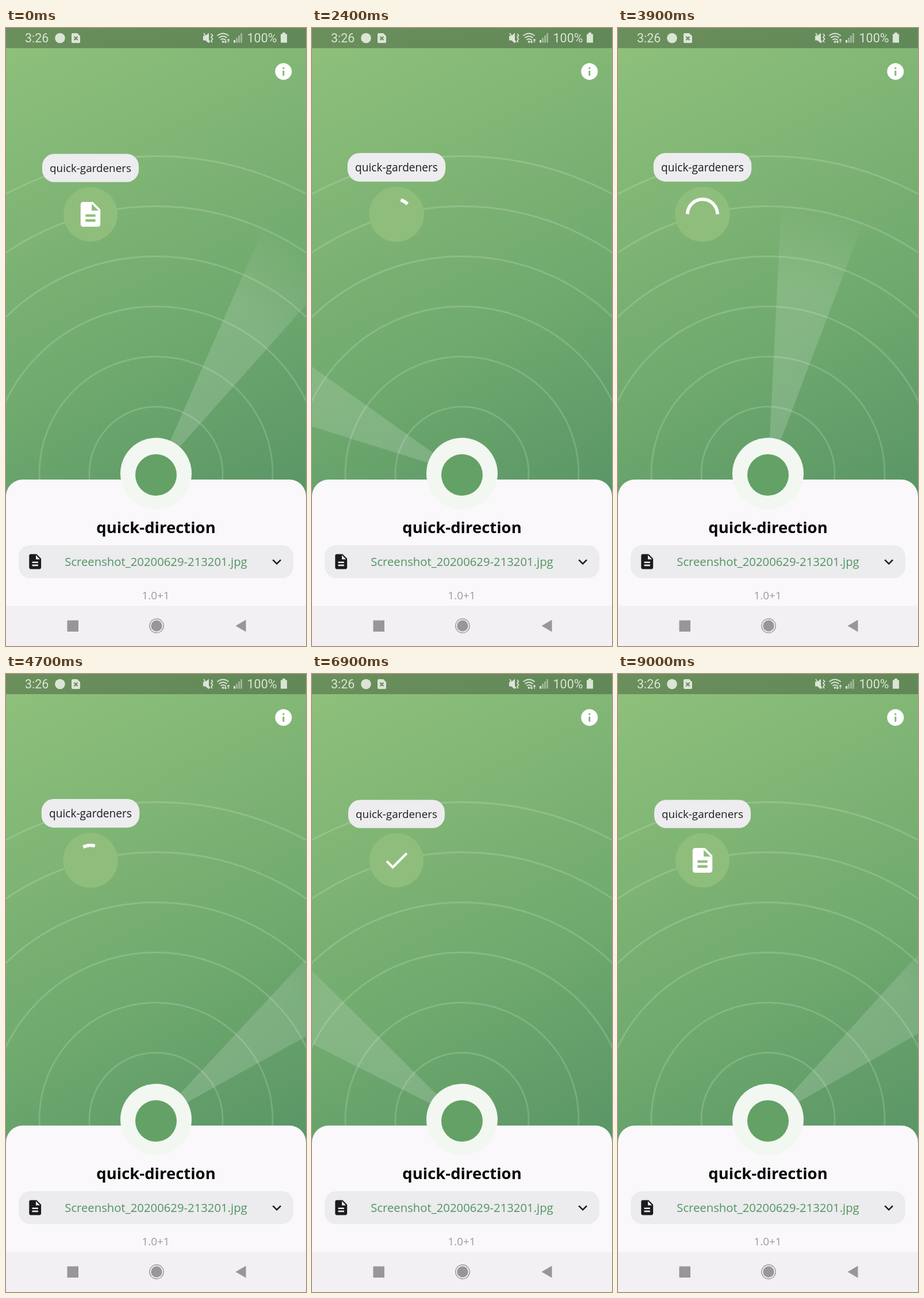
Write an HTML page that moves like this. It is 522 px wide and 1073 px high and loops after 9100 ms.

```html
<!DOCTYPE html>
<html lang="en">
<head>
<meta charset="utf-8">
<title>File drop radar</title>
<style>
  html, body { margin: 0; width: 100%; height: 100%; overflow: hidden; background: #faf8fb; }
  svg { display: block; width: 100vw; height: 100vh; }
  text { font-family: "Open Sans", sans-serif; }
  .status text { font-family: Roboto, sans-serif; font-size: 21.5px; }
</style>
</head>
<body>
<svg viewBox="0 0 522 1073" xmlns="http://www.w3.org/2000/svg">
  <defs>
    <linearGradient id="field" gradientUnits="userSpaceOnUse" x1="0" y1="0" x2="522" y2="1073">
      <stop offset="0" stop-color="#90c17c"/>
      <stop offset=".5" stop-color="#70aa6e"/>
      <stop offset=".78" stop-color="#5b9767"/>
    </linearGradient>
    <radialGradient id="beam" gradientUnits="userSpaceOnUse" cx="0" cy="0" r="464">
      <stop offset="0" stop-color="#fff" stop-opacity=".17"/>
      <stop offset=".7" stop-color="#fff" stop-opacity=".14"/>
      <stop offset="1" stop-color="#fff" stop-opacity=".01"/>
    </radialGradient>
    <path id="doc" d="M14 2H6c-1.1 0-1.99.9-1.99 2L4 20c0 1.1.89 2 1.99 2H18c1.1 0 2-.9 2-2V8l-6-6zm2 16H8v-2h8v2zm0-4H8v-2h8v2zm-3-5V3.5L18.5 9H13z"/>
  </defs>

  <rect width="522" height="1073" fill="url(#field)"/>
  <g id="rings" fill="none" stroke="#fff" stroke-opacity=".16" stroke-width="2.9"></g>
  <path id="sweep" fill="url(#beam)" d="M0 0L-72.6 -458.3A464 464 0 0 1 72.6 -458.3Z"/>

  <g id="peer">
    <rect x="63" y="218.5" width="168" height="49" rx="21" fill="#edecef"/>
    <text x="147" y="250" font-size="18.85" text-anchor="middle" fill="#1c1c1e">quick-gardeners</text>
    <circle cx="147" cy="323.5" r="47" fill="#8fbe7c"/>
    <use id="file" href="#doc" transform="translate(121.2 297.7) scale(2.15)" fill="#fff"/>
    <path id="check" transform="translate(121.2 297.7) scale(2.15)" fill="#fff" d="M9 16.17L4.83 12l-1.42 1.41L9 19 21 7l-1.41-1.41z"/>
  </g>
  <path id="spinner" fill="none" stroke="#fff" stroke-width="5.8" stroke-linecap="square"/>

  <path transform="translate(465.4 58.1) scale(1.45)" fill="#fff" d="M12 2C6.48 2 2 6.48 2 12s4.48 10 10 10 10-4.48 10-10S17.52 2 12 2zm1 15h-2v-6h2v6zm0-8h-2V7h2v2z"/>

  <g class="status" fill="#dbe5d6">
    <rect width="522" height="35" fill="#000" fill-opacity=".26"/>
    <text x="33" y="25">3:26</text>
    <circle cx="94" cy="17.5" r="8.8"/>
    <path d="M116 9h8l5 5v10q0 2-2 2h-11q-2 0-2-2v-13q0-2 2-2z"/>
    <path d="M118.500 15l6 6m0-6l-6 6" stroke="#67895a" stroke-width="2"/>
    <path d="M343 13.500h4l6-5v18l-6-5h-4z"/>
    <path d="M344 9l11 16M357 10l2.500 3-2.500 3 2.500 3-2.500 3 2 3" fill="none" stroke="#dbe5d6" stroke-width="1.8"/>
    <g fill="none" stroke="#dbe5d6" stroke-width="2">
      <path d="M367.500 13.500q10-8 20 0M370.500 17q7-5.500 14 0M373.500 20.500q4-3 8 0"/>
      <path d="M382 19.500v6m-2-2l2 2 2-2M387 25.500v-6m-2 2l2-2 2 2" stroke-width="1.4"/>
    </g>
    <circle cx="377.500" cy="23.800" r="1.900"/>
    <g fill-opacity=".5">
      <rect x="396" y="21" width="3" height="4.500" fill-opacity="1"/>
      <rect x="400" y="17" width="3" height="8.500"/>
      <rect x="404" y="13" width="3" height="12.500"/>
      <rect x="408" y="9" width="3" height="16.500"/>
    </g>
    <text x="471.500" y="25" text-anchor="end">100%</text>
    <path d="M481 8h5v2.500h3v15h-11v-15h3z"/>
  </g>

  <path d="M0 1003V813a29 29 0 0 1 29-29H493a29 29 0 0 1 29 29V1003z" fill="#faf8fb"/>
  <circle cx="261" cy="773.500" r="62" fill="#f2f7f1"/>
  <circle cx="261" cy="776" r="36" fill="#64a166"/>
  <text x="261" y="877" font-size="27.5" font-weight="700" text-anchor="middle" fill="#050505">quick-direction</text>
  <rect x="22" y="898" width="478" height="57" rx="20" fill="#ecebed"/>
  <use href="#doc" transform="translate(35.100 910.800) scale(1.3)" fill="#1b1a1d"/>
  <text x="261" y="934" font-size="20.3" text-anchor="middle" fill="#4f9562">Screenshot_20200629-213201.jpg</text>
  <path transform="translate(455.600 911.300) scale(1.3)" fill="#1b1a1d" d="M16.590 8.590L12 13.170 7.410 8.590 6 10l6 6 6-6z"/>
  <text x="260.500" y="991.500" font-size="18.85" text-anchor="middle" fill="#9b9a9d">1.0+1</text>

  <rect y="1003" width="522" height="70" fill="#f2f0f3"/>
  <g fill="#98969a">
    <rect x="106.500" y="1028.500" width="19.500" height="19.500"/>
    <circle cx="262" cy="1038" r="9.700"/>
    <circle cx="262" cy="1038" r="12.200" fill="none" stroke="#98969a" stroke-width="1.400"/>
    <path d="M399.500 1038l18-10.500v21z"/>
  </g>
</svg>
<script>
const LOOP = 9100, STEP = 100;
const BUSY = 2300, DONE = 5300, LEAVE = 7300, BACK = 8400;
const SWEEP_MS = 4315, SWEEP_START = 1517;
const SPIN_MS = 1333;
const $ = id => document.getElementById(id);
const clamp = x => Math.min(1, Math.max(0, x));
const show = (el, on) => el.setAttribute("visibility", on ? "visible" : "hidden");

for (let r = 116; r <= 551; r += 87) {
  $("rings").innerHTML += `<circle cx="261" cy="773.5" r="${r}"/>`;
}

// cubic-bezier(.4, 0, .2, 1)
function ease(x) {
  let lo = 0, hi = 1, s = .5;
  for (let i = 0; i < 20; i++) {
    s = (lo + hi) / 2;
    const bx = 1.2 * (1 - s) ** 2 * s + .6 * (1 - s) * s * s + s ** 3;
    if (bx < x) lo = s; else hi = s;
  }
  return 3 * s * s - 2 * s ** 3;
}

function easeOutBack(x) {
  const k = 1.3, y = x - 1;
  return 1 + (k + 1) * y ** 3 + k * y * y;
}

function arc(cx, cy, r, from, sweep) {
  const at = deg => {
    const a = deg * Math.PI / 180;
    return `${(cx + r * Math.sin(a)).toFixed(2)} ${(cy - r * Math.cos(a)).toFixed(2)}`;
  };
  return `M${at(from)}A${r} ${r} 0 ${sweep > 180 ? 1 : 0} 1 ${at(from + sweep)}`;
}

function spinnerArc(t) {
  const n = t / SPIN_MS, turn = Math.floor(n), u = n - turn;
  const head = ease(clamp(u * 2)), tail = ease(clamp(u * 2 - 1));
  const from = tail * 270 + u * 306 - turn * 144;
  return arc(147, 323.5, 26.1, from, Math.max(.1, (head - tail) * 270));
}

function peerScale(t) {
  if (t >= BACK) return easeOutBack(clamp((t - BACK + STEP) / 400));
  if (t >= LEAVE) return 1 - ease(clamp((t - LEAVE + STEP) / 300));
  return t >= BUSY && t < DONE ? 1.015 : 1;
}

function draw(t) {
  const phase = ((t - SWEEP_START) / SWEEP_MS + 1) % 1;
  $("sweep").setAttribute("transform", `translate(261 773.5) rotate(${-108 + 217 * phase})`);

  const k = peerScale(t), busy = t >= BUSY && t < DONE;
  $("peer").setAttribute("transform", `translate(147 323.5) scale(${k}) translate(-147 -323.5)`);
  show($("peer"), k > .01);
  show($("file"), k > .01 && (t < BUSY || t >= BACK));
  show($("check"), k > .01 && t >= DONE && t < BACK);
  show($("spinner"), busy);
  if (busy) $("spinner").setAttribute("d", spinnerArc(t - BUSY));
}

const start = performance.now();
function tick() {
  const t = (performance.now() - start) % LOOP;
  draw(Math.floor(t / STEP) * STEP);
  requestAnimationFrame(tick);
}
tick();
</script>
</body>
</html>
```
